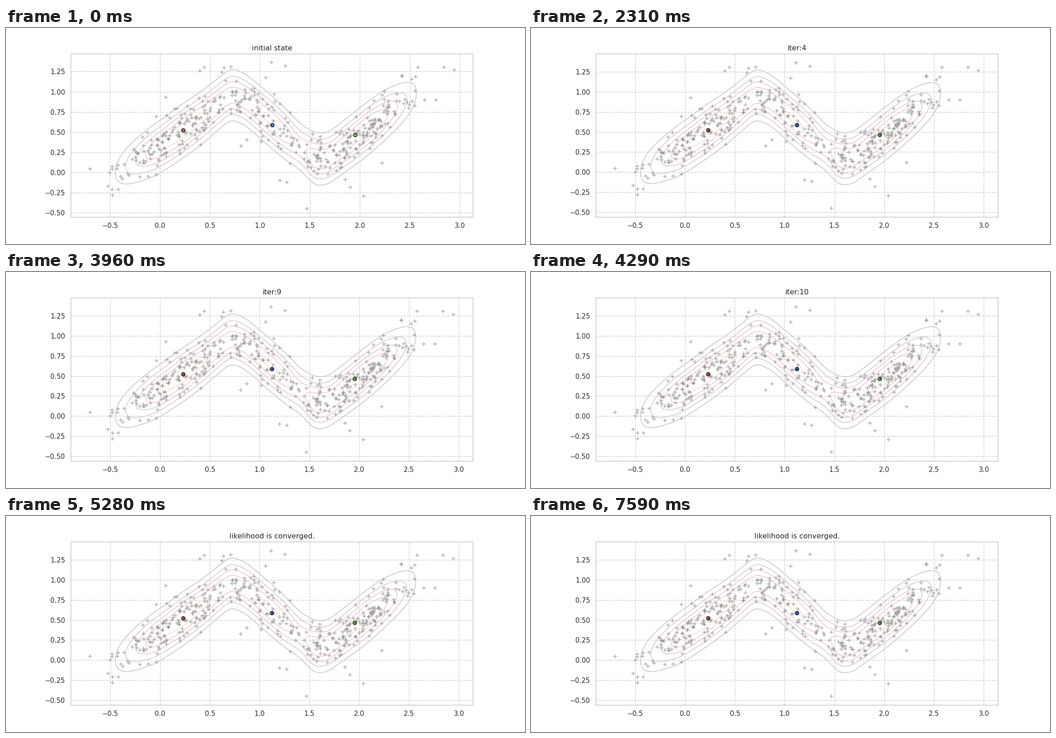
Recreate the animation shown at these times as a matplotlib script. Size 1159 by 483 pixels, loop 8 s.

```python
import numpy as np
import matplotlib as mpl
import matplotlib.pyplot as plt
from matplotlib.animation import FuncAnimation

W, H, DPI = 1159, 483, 96
INTERVAL, LOOP = 40, 8000
FIRST, STEP, CONVERGED = 1320, 330, 5280

mpl.rcParams["font.family"] = "DejaVu Sans"
TEXT, GRID = "#262626", "#cccccc"
LIMITS_START = ((-0.8925, 3.1335), (-0.553, 1.469))
LIMITS_RUN = ((-0.8955, 3.143), (-0.562, 1.475))

# The density is a band: a zigzag ridge with a Gaussian profile across it
RIDGE = [(-1, -0.40), (0, 0.317), (0.42, 0.68), (0.71, 0.98), (0.86, 0.90),
         (1.12, 0.62), (1.55, 0.16), (1.68, 0.17), (1.95, 0.42),
         (2.27, 0.73), (3.4, 1.70)]
HEIGHT = [(-0.55, 0), (-0.04, 5), (0.23, 5.8), (0.51, 5), (0.71, 4.6),
          (1.12, 5.2), (1.25, 4.8), (1.41, 3.3), (1.55, 5.1), (1.74, 4.8),
          (2.05, 5.6), (2.21, 4.8), (2.66, 0)]
BAND, SPREAD = 0.181, 0.14
LEVELS = [1, 2, 3, 4, 5]
LEVEL_COLORS = ["#d1ced2", "#dfd0da", "#ead0da", "#f5d0d8", "#fcdfd6"]

SAMPLES = 410
OUTLIERS = [(-0.70, 0.045), (-0.52, -0.17), (-0.475, -0.285), (-0.48, 0.07),
            (0.06, 0.93), (0.40, 1.26), (0.445, 1.305), (0.64, 1.295),
            (0.71, 1.31), (1.115, 1.365), (1.255, 1.32), (1.06, 1.175),
            (0.81, 0.325), (0.87, 0.405), (2.425, 1.20), (2.52, 1.15),
            (2.58, 1.305), (2.84, 1.305), (2.945, 1.27), (2.65, 0.90),
            (2.76, 0.90), (2.225, 0.118), (2.04, -0.297), (1.47, -0.452),
            (1.905, -0.185), (1.855, -0.092), (1.2, -0.1), (1.27, -0.12)]

MEANS = np.array([(0.233, 0.521), (1.124, 0.586), (1.955, 0.463)])
MEAN_COLORS = ["#d65f5f", "#4878cf", "#6acc65"]


def smooth(knots, x, width=0.04):
    """Straight lines between the knots, blurred to round the corners."""
    offsets = np.linspace(-3, 3, 31)
    weights = np.exp(-offsets**2 / 2)
    values = np.interp(x[:, None] + width * offsets, *zip(*knots))
    return values @ weights / weights.sum()


def sample_cloud(x, ridge, height):
    rng = np.random.default_rng(12)
    cdf = np.cumsum(height)
    px = np.interp(rng.random(SAMPLES), cdf / cdf[-1], x)
    py = np.interp(px, x, ridge) + rng.normal(0, SPREAD, SAMPLES)
    return np.vstack([np.column_stack([px, py]), OUTLIERS])


fig = plt.figure(figsize=(W / DPI, H / DPI), dpi=DPI, facecolor="white")
ax = fig.add_axes([0.125, 0.125, 0.775, 0.755])
ax.set_axisbelow(True)
ax.grid(True, color=GRID, lw=1, ls="--")
ax.set_xticks(np.arange(-0.5, 3.01, 0.5))
ax.set_yticks(np.arange(-0.5, 1.26, 0.25))
ax.tick_params(length=0, pad=9.5, labelsize=11.07, labelcolor=TEXT)
for spine in ax.spines.values():
    spine.set(color=GRID, linewidth=1.25)

x, y = np.linspace(-0.8, 2.9, 260), np.linspace(-0.5, 1.45, 180)
ridge, height = smooth(RIDGE, x), smooth(HEIGHT, x)
density = height * np.exp(-((y[:, None] - ridge) / BAND)**2 / 2)
ax.contour(x, y, density, LEVELS, colors=LEVEL_COLORS, linewidths=1.5,
           zorder=2)

ax.scatter(*sample_cloud(x, ridge, height).T, s=36, marker="+", color="gray",
           alpha=0.55, linewidths=1.5, zorder=3)
ax.scatter(*MEANS.T, s=36, c=MEAN_COLORS, edgecolors="black", linewidths=1,
           zorder=4)
trail, = ax.plot(*(MEANS + [0.002, 0.004]).T, ls="none", marker="^", ms=2.8,
                 color="#1c1c1c", mew=0, zorder=5)
title = ax.set_title("", fontsize=12.07, color=TEXT, pad=6)


def update(i):
    now = (i + 1) * INTERVAL - 1
    started = now >= FIRST
    if now >= CONVERGED:
        title.set_text("likelihood is converged.")
    elif started:
        title.set_text(f"iter:{(now - FIRST) // STEP + 1}")
    else:
        title.set_text("initial state")
    xlim, ylim = LIMITS_RUN if started else LIMITS_START
    ax.set_xlim(xlim)
    ax.set_ylim(ylim)
    trail.set_visible(started)
    return title, trail


anim = FuncAnimation(fig, update, frames=LOOP // INTERVAL, interval=INTERVAL,
                     repeat=True, repeat_delay=0)
plt.show()
```
